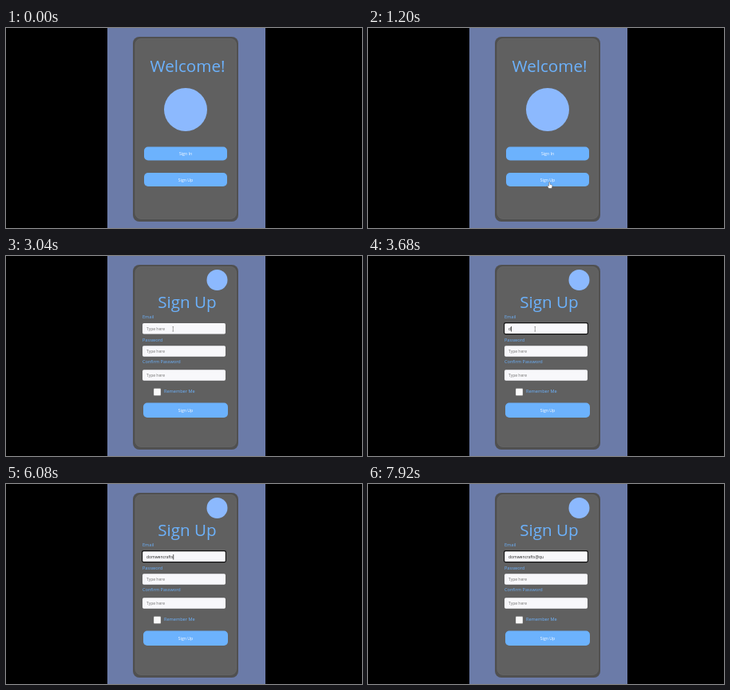
An HTML page that plays this animation: 446 px wide and 250 px high, repeating every 8000 ms.

```html
<!DOCTYPE html>
<html lang="en">
<head>
<meta charset="utf-8">
<title>Sign-up flow</title>
<style>
  html, body { margin: 0; width: 100%; height: 100%; overflow: hidden; background: #000; }
  svg { display: block; width: 100vw; height: 100vh; }
  text { font: 5.6px "Open Sans", "Noto Sans", sans-serif; fill: #6cb2fd; white-space: pre; }
  .title { font-size: 20.6px; text-anchor: middle; }
  .button rect { fill: #6cb2fd; }
  .button text { font-size: 5.2px; fill: #fff; text-anchor: middle; }
  .field rect { fill: #f8f8fb; }
  .field text { font-size: 5px; fill: #757575; }
  .field .typed { fill: #222; }
  .badge { fill: #8cb9fe; }
</style>
</head>
<body>
<svg viewBox="0 0 446 250">
  <rect width="446" height="250" fill="#000"/>
  <rect x="127" width="198" height="250" fill="#6b7ba8"/>
  <rect x="159" y="11" width="132" height="231" rx="8" fill="#505050"/>
  <rect x="162" y="13.5" width="126.5" height="225" rx="7" fill="#606060" stroke="#6c6c6c" stroke-width=".6"/>

  <g id="welcome">
    <text class="title" x="227.5" y="55">Welcome!</text>
    <circle class="badge" cx="225" cy="102" r="27"/>
    <g class="button">
      <rect x="173" y="148.5" width="104" height="17" rx="5"/>
      <text x="225" y="159">Sign In</text>
    </g>
    <g class="button">
      <rect x="173" y="181" width="104" height="17" rx="5"/>
      <text x="225" y="192">Sign Up</text>
    </g>
  </g>

  <g id="signup">
    <circle class="badge" cx="264.5" cy="30" r="13"/>
    <text class="title" x="227" y="65">Sign Up</text>
    <g id="fields"></g>
    <rect x="185" y="165.5" width="9" height="9" rx="1" fill="#fafafa" stroke="#777" stroke-width=".4"/>
    <text x="198" y="170.5">Remember Me</text>
    <g class="button">
      <rect x="172" y="183.5" width="106" height="18.5" rx="5"/>
      <text x="225" y="194.7">Sign Up</text>
    </g>
    <rect id="focus" x="170.6" y="83.6" width="104.8" height="14" rx="1.5" fill="none" stroke="#101010" stroke-width="1.1"/>
    <rect id="caret" y="88" width=".7" height="6.5" fill="#111"/>
  </g>

  <path id="arrow" d="M0 0V7L1.7 5.5 2.8 8 3.9 7.5 2.8 5.1H5Z" fill="#fff" stroke="#222" stroke-width=".4"/>
  <path id="hand" d="M-.7 .6Q0 -.4 .7 .6V3L3 3.5Q3.8 3.8 3.6 5L3 8H-.9L-2.5 5.2Q-2.6 4.2 -1.6 4.4L-.7 5Z" fill="#fff" stroke="#333" stroke-width=".4"/>
  <path id="beam" d="M-.8 -2.8H.8M0 -2.8V2.8M-.8 2.8H.8" fill="none" stroke="#555" stroke-width=".5"/>
</svg>
<script>
const LOOP = 8000, STEP = 80, PAGE_CHANGE = 2400, FOCUS = 3200;
const EMAIL = "domwencrafts@qu";
// [time, number of characters typed]
const KEYS = [[3680, 1], [3760, 2], [3920, 3], [4320, 4], [4400, 5], [4480, 6], [4640, 7],
  [4800, 8], [4880, 9], [4960, 10], [5040, 12], [6560, 13], [6880, 14], [7120, 15]];
const CARET_ON = [[FOCUS, 5600], [6080, 7440], [7680, 7920]];
const FIELDS = [["Email", 78, 84], ["Password", 107, 112.3], ["Confirm Password", 134, 142.3]];

const el = id => document.getElementById(id);
const show = (node, on) => node.setAttribute("display", on ? "inline" : "none");

el("fields").innerHTML = FIELDS.map(([label, baseline, top]) => `
  <text x="171" y="${baseline}">${label}</text>
  <g class="field">
    <rect x="171" y="${top}" width="104" height="13.5" rx="1.7"/>
    <text x="176" y="${top + 9}">Type here</text>
  </g>`).join("");
const emailText = document.querySelector(".field text");

function move(t, start, end, from, to) {
  const p = Math.min(1, Math.max(0, (t - start) / (end - start)));
  const eased = p * p * (3 - 2 * p);
  return from.map((v, i) => v + (to[i] - v) * eased);
}

function drawPointer(t) {
  const first = t < PAGE_CHANGE;
  const [x, y] = first
    ? move(t, 400, 1200, [273, 93], [227.3, 192.5])
    : move(t, PAGE_CHANGE, 3040, [225.3, 189], [209.3, 91.3]);
  const visible = t >= 400 && t < 5040;
  const overButton = first
    ? (y > 148.5 && y < 165.5) || y > 181
    : y > 183.5;
  const overField = !first && FIELDS.some(([, , top]) => y > top && y < top + 13.5);
  const kind = overButton ? "hand" : overField ? "beam" : "arrow";
  for (const id of ["arrow", "hand", "beam"]) {
    show(el(id), visible && id === kind);
    el(id).setAttribute("transform", `translate(${x} ${y})`);
  }
}

function drawEmail(t) {
  const count = KEYS.reduce((n, [time, typed]) => t >= time ? typed : n, 0);
  const value = count ? EMAIL.slice(0, count) : "Type here";
  if (emailText.textContent !== value) emailText.textContent = value;
  emailText.classList.toggle("typed", count > 0);
  el("caret").setAttribute("x", 176 + (count ? emailText.getComputedTextLength() : 0));
  show(el("caret"), CARET_ON.some(([on, off]) => t >= on && t < off));
  show(el("focus"), t >= FOCUS);
}

function frame() {
  const t = Math.floor(performance.now() % LOOP / STEP) * STEP;
  show(el("welcome"), t < PAGE_CHANGE);
  show(el("signup"), t >= PAGE_CHANGE);
  drawEmail(t);
  drawPointer(t);
  requestAnimationFrame(frame);
}
frame();
</script>
</body>
</html>
```
